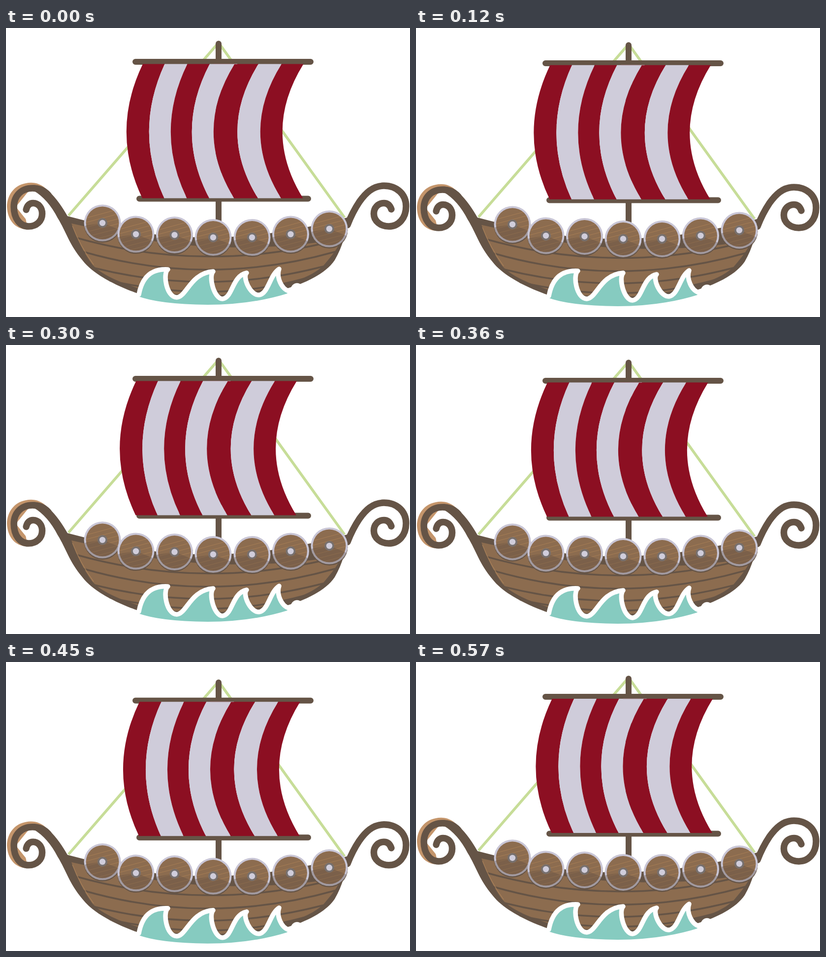
These frames come from a looping animation (821 px wide and 590 px high, 600 ms). An HTML page:

```html
<!DOCTYPE html>
<html lang="en">
<head>
<meta charset="utf-8">
<title>Longship</title>
<style>
html, body { margin: 0; width: 100%; height: 100%; overflow: hidden; background: #fff; }
svg { display: block; width: 821px; height: 590px; }
.line { fill: none; stroke: #655446; stroke-linecap: round; stroke-linejoin: round; }
</style>
</head>
<body>
<svg viewBox="0 0 821 590">
  <defs>
    <clipPath id="disc"><circle r="33.500"/></clipPath>
    <g id="shield">
      <circle cy="2.500" r="37.500" fill="#655446"/>
      <circle r="37.500" fill="#c9c6d6"/>
      <circle r="33.500" fill="#8c6c4f"/>
      <path clip-path="url(#disc)" fill="none" stroke="#a67d55" d="M-30 -11L25 -26M-34 -1L34 -19M-34 9L34 -9M-34 19L34 1M-28 27L34 11M-14 33L30 21"/>
      <path d="M-37 6L0 0L35 14A37.500 37.500 0 0 1 -37 6Z" fill="#5d4b40" opacity=".36"/>
      <circle r="10" fill="#77706e"/>
      <circle r="6.200" fill="#d0cddb"/>
    </g>
  </defs>
  <g id="ship">
    <path d="M127 383L432 30L688 387" fill="none" stroke="#c7dd98" stroke-width="5.500"/>
    <path class="line" stroke-width="12" d="M432 32V420M263 69H619M271 348.500H614"/>
    <g id="sail"></g>

    <path fill="#c4956b" d="M84 331C70 316 54 314 40 317C17 321 2 341 2 365C3 393 20 412 45 411L40 390L20 365L50 328Z"/>
    <path class="line" stroke-width="13.500" d="M783 370C780 361 775 357.500 768 357.500C756 357.500 747.500 367 747.500 379C747.500 394 761 405 778 405C798 405 813 388 813 364C813 340 795 322 768 322C745 322 730 338 718 355Q704 376 694 402"/>
    <path class="line" stroke-width="13.500" d="M41 371C43 362 48 357.500 55 357.500C66 357.500 73.500 367 73.500 379C73.500 394 62 405 46 405C28 405 16 388 16 365C16 343 31 327 54 327C68 327 78 332 86 341"/>
    <path fill="#655446" d="M56 320.500Q73 321 86 332C104 349 115 367 125 384L160 393Q410 465 693 387C692 418 684 446 668 474C654 495 626 512 592 525Q430 580 268 542C222 526 177 502 156 475C127 440 123 417 105 388Q85 349 56 332Z"/>
    <path fill="#8c6c4f" d="M133 399L160 405Q410 475 682 431C675 449 662 465 646 484C630 500 606 511 578 520Q420 566 268 531C226 518 188 500 174 481Q150 447 133 399Z"/>
    <path class="line" stroke-width="3.500" d="M142 428Q410 504 684 430M158 457Q410 530 668 457M180 490Q410 548 644 487M212 516Q420 563 605 512"/>
    <path d="M135 404Q151 446 178 483" fill="none" stroke="#a98059" stroke-width="1.300"/>
    <g id="shields"></g>

    <path fill="#86cbc0" d="M270 546C276 512 292 491 329 493C318 501 326 550 347 550C367 549 375 500 421 497C411 508 423 553 440 553C461 551 459 506 489 500C480 508 496 546 514 545C533 543 536 504 555 492C549 509 560 538 575 541Q500 565 410 565Q310 564 267 547Z"/>
    <path class="line" style="stroke:#fff" stroke-width="9.500" d="M270 544C276 512 292 491 329 493C318 501 326 550 347 550C367 549 375 500 421 497C411 508 423 553 440 553C461 551 459 506 489 500C480 508 496 546 514 545C533 543 536 504 555 492C549 509 560 533 575 537"/>
    <path fill="#fff" d="M569 545L578 533C581 522 591 518 598 523L606 532L582 549Z"/>
  </g>
</svg>
<script>
const $ = id => document.getElementById(id);

// Each seam bows from its top corner to its belly and back.
const tops = [278, 322.5, 368.5, 414, 464.5, 513, 560, 604.5];
const bellies = [245, 291, 335, 378, 422, 470.5, 517, 562];
const control = i => 2 * bellies[i] - tops[i];
$('sail').innerHTML = tops.slice(1).map((right, i) =>
  `<path fill="${i % 2 ? '#cfccda' : '#8c0f22'}" d="M${tops[i]} 73.500Q${control(i)} 211 ${tops[i] - 1} 347.500` +
  `H${right - 1}Q${control(i + 1)} 211 ${right} 73.500Z"/>`
).join('') + '<path d="M422 73.500H470" stroke="#a98790"/>';

const shields = [[196, 398], [264, 421], [342.5, 422.5], [421, 427.5], [500, 427.5], [578.5, 421], [657, 410]];
$('shields').innerHTML = shields.map(([x, y]) =>
  `<use href="#shield" transform="translate(${x} ${y})"/>`).join('');

const LOOP = 600, STEP = 30;
const wave = p => 1 - Math.abs(2 * p - 1); // 0 to 1 and back

function draw(now) {
  const p = Math.floor(now % LOOP / STEP) * STEP / LOOP;
  const bob = wave(p * 2 % 1) * (p < .5 ? 3.7 : 9.8);
  $('ship').setAttribute('transform', `translate(0 ${bob})`);
  // The sail lags a little behind the yards.
  $('sail').setAttribute('transform', `translate(${-13.6 * wave(p)} ${-.22 * bob})`);
  requestAnimationFrame(draw);
}
draw(0);
</script>
</body>
</html>
```
